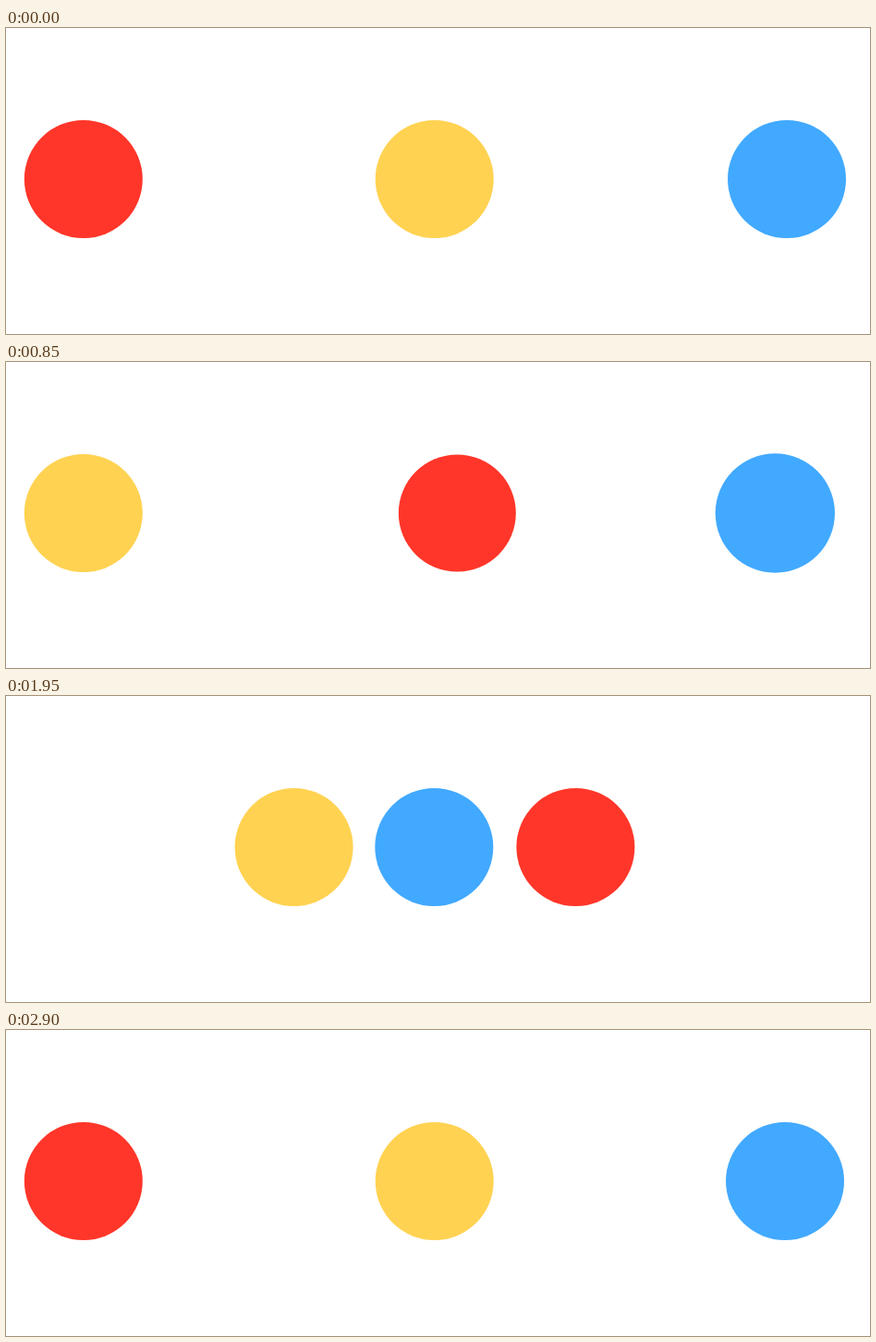
An HTML page with a canvas that plays this animation: 935 px wide and 332 px high, repeating every 2950 ms.

```html
<!DOCTYPE html>
<html lang="en">
<head>
<meta charset="utf-8">
<title>Three dots</title>
<style>
  html, body { margin: 0; width: 100%; height: 100%; overflow: hidden; background: #fff; }
  canvas { display: block; }
</style>
</head>
<body>
<canvas id="stage" width="935" height="332"></canvas>
<script>
const ctx = document.getElementById('stage').getContext('2d');
const LOOP = 2950, STEP = 50;
const LEFT = 83.8, MID = 463.7, RIGHT = 845, Y = 164, R = 64;
const COLORS = { red: '#ff3629', yellow: '#ffd251', blue: '#41a9ff' };

const mix = (a, b, p) => a + (b - a) * p;

// Progress 0..1 at constant speed, with speed ramps of `a` ms in and `b` ms out
function glide(t, dur, a, b) {
  if (t <= 0) return 0;
  if (t >= dur) return 1;
  const speed = 1 / (dur - (a + b) / 2);
  if (t < a) return speed * t * t / (2 * a);
  if (t > dur - b) return 1 - speed * (dur - t) ** 2 / (2 * b);
  return speed * (t - a / 2);
}

// Swelling that peaks halfway through an 800 ms swap
const swell = t => glide(400 - Math.abs(t - 400), 400, 150, 0);
const front = t => R * (1 + 0.4 * swell(t));
const back = t => R * (1 - 0.3 * swell(t));

function swapFirst(t) {
  return [
    ['blue', RIGHT, R],
    ['yellow', mix(MID, LEFT, glide(t, 800, 25, 25)), back(t)],
    ['red', mix(LEFT, MID, glide(t, 800, 10, 10)), front(t)]
  ];
}

function swapSecond(t) {
  return [
    ['yellow', LEFT, R],
    ['red', mix(MID, RIGHT, glide(t, 800, 0, 50)), back(t)],
    ['blue', mix(RIGHT, MID, glide(t, 800, 50, 50)), front(t)]
  ];
}

function merge(t) {
  const p = glide(t, 592, 50, 50);
  return [
    ['yellow', mix(LEFT, MID, p), R],
    ['blue', MID - 0.4, R],
    ['red', mix(RIGHT, MID, p), R]
  ];
}

// Spread past the ends, then settle
function spread(t) {
  const out = glide(t, 400, 50, 50), rest = glide(t - 400, 150, 30, 30);
  const side = (end, over) => mix(MID, end + over, out) - over * rest;
  return [
    ['yellow', MID, R],
    ['blue', side(RIGHT, 21) - 2 * rest, R],
    ['red', side(LEFT, -17), R]
  ];
}

function pose(t) {
  if (t < 800) return swapFirst(t);
  if (t < 1600) return swapSecond(t - 800);
  if (t < 2350) return merge(t - 1600);
  return spread(t - 2350);
}

function draw(t) {
  ctx.fillStyle = '#fff';
  ctx.fillRect(0, 0, 935, 332);
  for (const [name, x, r] of pose(t)) {
    ctx.fillStyle = COLORS[name];
    ctx.beginPath();
    ctx.arc(x, Y, r, 0, Math.PI * 2);
    ctx.fill();
  }
}

const start = performance.now();
function tick() {
  const t = (performance.now() - start + 2) % LOOP;
  draw(Math.floor(t / STEP) * STEP);
  requestAnimationFrame(tick);
}
tick();
</script>
</body>
</html>
```
